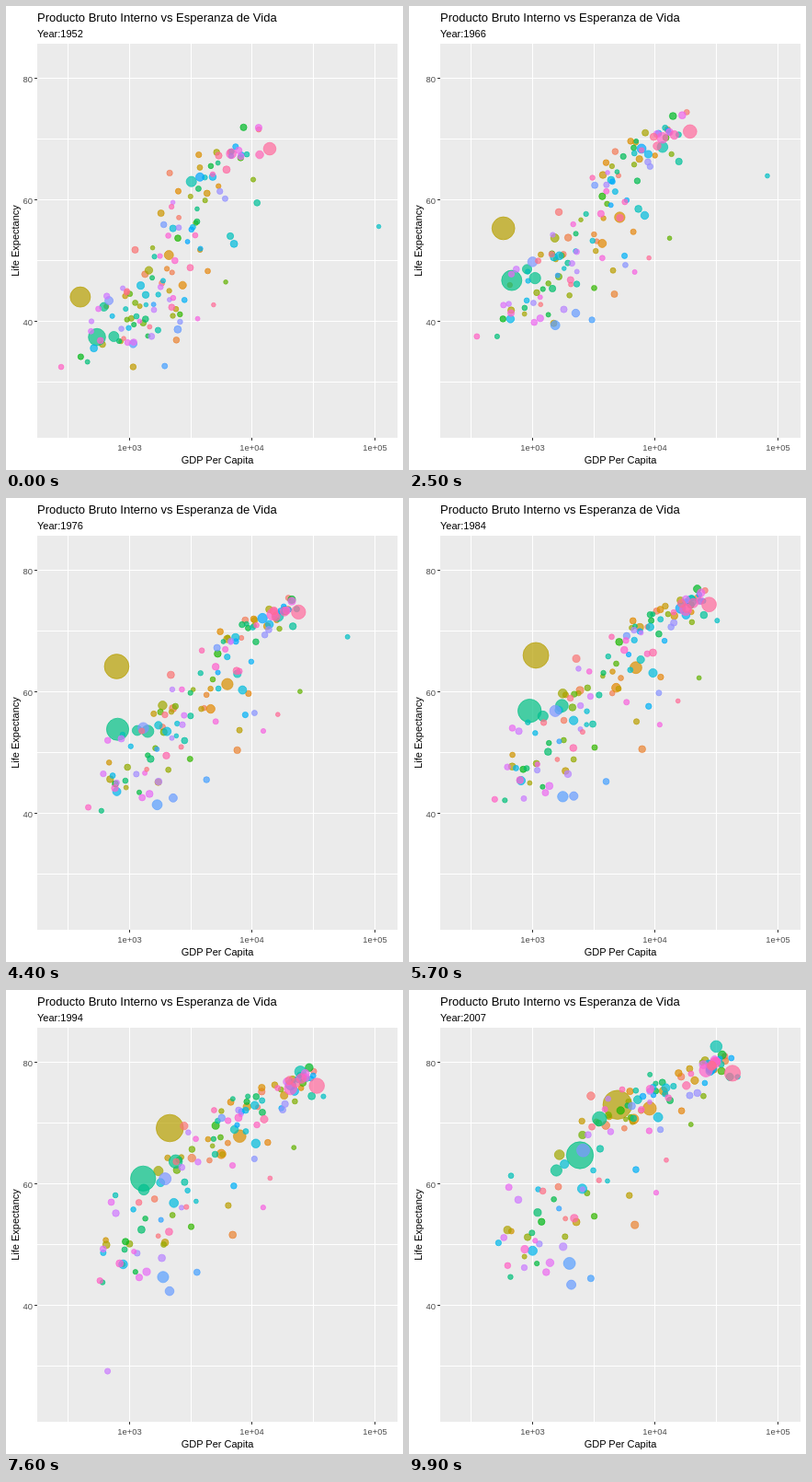
Animation, 432 px wide and 504 px high, one loop 10000 ms. Source, as an HTML page:

```html
<!DOCTYPE html>
<html lang="es">
<head>
<meta charset="utf-8">
<title>Producto Bruto Interno vs Esperanza de Vida</title>
<style>
  html, body { margin: 0; width: 100%; height: 100%; overflow: hidden; background: #fff; }
  svg { display: block; font-family: "Liberation Sans", Arial, sans-serif; font-size: 11px; }
  .tick { font-size: 9.4px; fill: #4d4d4d; }
  .grid { stroke: #fff; }
  .mark { stroke: #333; }
</style>
</head>
<body>
<svg width="432" height="504" viewBox="0 0 432 504">
  <rect width="432" height="504" fill="#fff"/>
  <rect x="34" y="41" width="392" height="428" fill="#ebebeb"/>
  <g id="axes"></g>
  <g id="dots" stroke-width="0.9" fill-opacity="0.7" stroke-opacity="0.7"></g>
  <text x="34" y="17" font-size="13">Producto Bruto Interno vs Esperanza de Vida</text>
  <text id="year" x="34" y="34">Year:1952</text>
  <text x="230" y="497" text-anchor="middle">GDP Per Capita</text>
  <text transform="translate(14 255) rotate(-90)" text-anchor="middle">Life Expectancy</text>
</svg>
<script>
const COUNT = 142, FRAMES = 100, STEP = 100;
const LAST = 11; // knots are five years apart, 1952 to 2007
const $ = id => document.getElementById(id);
const xOf = logGdp => 134 + 133.5 * (logGdp - 3);
const yOf = life => 342.5 - 6.6 * (life - 40);
const rOf = pop => 2.1 + 13.7 * Math.sqrt(pop / 1319);
const mix = (a, b, t) => a + (b - a) * t;
const knots = fn => Array.from({ length: LAST + 1 }, (_, k) => fn(k));

function add(parent, tag, attrs, text) {
  const el = document.createElementNS('http://www.w3.org/2000/svg', tag);
  for (const k in attrs) el.setAttribute(k, attrs[k]);
  if (text) el.textContent = text;
  parent.append(el);
  return el;
}

function drawAxes() {
  const g = $('axes');
  const line = (cls, x1, y1, x2, y2) => add(g, 'line', { class: cls, x1, y1, x2, y2 });
  for (const x of [67.5, 134.5, 201.5, 267.5, 334.5, 401.5]) line('grid', x, 41, x, 469);
  for (let y = 78.5; y < 469; y += 66) line('grid', 34, y, 426, y);
  [134.5, 267.5, 401.5].forEach((x, i) => {
    line('mark', x, 469, x, 472);
    add(g, 'text', { class: 'tick', x, y: 483, 'text-anchor': 'middle' }, '1e+0' + (i + 3));
  });
  for (const life of [80, 60, 40]) {
    const y = yOf(life);
    line('mark', 31, y, 34, y);
    add(g, 'text', { class: 'tick', x: 29, y: y + 4, 'text-anchor': 'end' }, String(life));
  }
}

// Evenly spaced hues in polar LUV, luminance 65, chroma 100
function hueColor(i) {
  const h = (15 + 360 * i / COUNT) * Math.PI / 180, L = 65, C = 100;
  const Y = ((L + 16) / 116) ** 3;
  const u = C * Math.cos(h) / (13 * L) + 0.19784;
  const v = C * Math.sin(h) / (13 * L) + 0.46834;
  const X = 9 * Y * u / (4 * v), Z = 3 * Y / v - X / 3 - 5 * Y;
  const rgb = [
    3.2405 * X - 1.5371 * Y - 0.4985 * Z,
    -0.9693 * X + 1.876 * Y + 0.0416 * Z,
    0.0556 * X - 0.204 * Y + 1.0572 * Z
  ].map(c => {
    const s = c <= 0.00304 ? 12.92 * c : 1.055 * c ** (1 / 2.4) - 0.055;
    return Math.round(255 * Math.min(1, Math.max(0, s)));
  });
  return `rgb(${rgb})`;
}

let seed = 1952;
function rand() {
  seed = (seed + 0x6D2B79F5) | 0;
  let t = Math.imul(seed ^ (seed >>> 15), 1 | seed);
  t = (t + Math.imul(t ^ (t >>> 7), 61 | t)) ^ t;
  return ((t ^ (t >>> 14)) >>> 0) / 4294967296;
}
// Bell-shaped, bounded to about three deviations
const bell = () => (rand() + rand() + rand() - 1.5) * 1.9;
const pair = () => {
  const a = bell();
  return [a, 0.6 * a + 0.8 * bell()];
};

// Value at knot k on a polyline of [knot, value] points
function along(points, k) {
  let j = 0;
  while (j < points.length - 2 && k > points[j + 1][0]) j++;
  const [[k0, a], [k1, b]] = points.slice(j, j + 2);
  return mix(a, b, (k - k0) / (k1 - k0));
}

const dots = [];
function addDot(i, logGdp, life, pop) {
  dots.push({
    i,
    x: knots(k => xOf(logGdp(k))),
    y: knots(k => yOf(life(k))),
    r: knots(k => rOf(pop(k)))
  });
}

// Path through key points [knot, gdp, life], population growing evenly
function addPath(i, pop0, pop1, points) {
  const gdp = points.map(([k, g]) => [k, Math.log10(g)]);
  const life = points.map(([k, , l]) => [k, l]);
  addDot(i, k => along(gdp, k), k => along(life, k), k => mix(pop0, pop1, k / LAST));
}

// Rise from start to end; bend below 1 grows early, above 1 late
function addRise(i, pop0, pop1, [g0, l0], [g1, l1], bend) {
  addDot(i,
    k => mix(Math.log10(g0), Math.log10(g1), (k / LAST) ** bend),
    k => mix(l0, l1, (k / LAST) ** 0.9),
    k => mix(pop0, pop1, k / LAST));
}

addPath(24, 556, 1319, [[0, 400, 44], [1, 576, 50.5], [2, 488, 44.5], [3, 613, 58.4],
  [4, 677, 63.1], [6, 962, 65.5], [11, 4959, 73]]);
addPath(58, 372, 1110, [[0, 547, 37.4], [5, 813, 54.2], [8, 1164, 60.2], [11, 2452, 64.7]]);
addPath(71, 0.2, 2.5, [[0, 108382, 55.6], [3, 80895, 64.6], [5, 59265, 69.3],
  [6, 31354, 71.3], [11, 47307, 77.6]]);
addPath(107, 2.5, 9, [[0, 493, 40], [6, 882, 46.2], [8, 737, 23.6], [9, 590, 36.1], [11, 863, 46.2]]);

addRise(134, 158, 301, [13990, 68.4], [42952, 78.2], 0.9);
addRise(59, 82, 224, [750, 37.5], [3541, 70.7], 1.1);
addRise(14, 57, 190, [2109, 50.9], [9066, 72.4], 0.35);
addRise(66, 86, 127, [3217, 63], [31656, 82.6], 0.42);
addRise(97, 41, 169, [685, 43.4], [2606, 65.5], 0.9);
addRise(94, 33, 135, [1077, 36.3], [2014, 46.9], 0.4);

// The rest: drifting clusters with mean and spread at 1952, 1977, 2007
const clusters = [
  { n: 22, pop: 9, gdp: [3.84, 4.24, 4.48], gdpSd: [0.17, 0.1, 0.09], life: [68, 73.5, 79.8], lifeSd: [2.6, 1.4, 1] },
  { n: 23, pop: 6, gdp: [3.52, 3.94, 4.08], gdpSd: [0.2, 0.15, 0.2], life: [61, 70, 75.3], lifeSd: [5, 1.8, 2] },
  { n: 37, pop: 6, gdp: [3.3, 3.6, 3.8], gdpSd: [0.24, 0.25, 0.3], life: [48.5, 60.5, 72.5], lifeSd: [6.5, 5, 3.5] },
  { n: 42, pop: 5, gdp: [2.96, 3.07, 3.1], gdpSd: [0.23, 0.23, 0.27], life: [39.5, 48.5, 54.5], lifeSd: [4.5, 5, 6.5] },
  { n: 8, pop: 4, gdp: [3.6, 4.15, 4.05], gdpSd: [0.2, 0.23, 0.25], life: [42, 56, 63], lifeSd: [5, 5, 9] }
];

function addMember(i, c) {
  const [a, b] = pair(), [da, db] = pair();
  const pop = c.pop * Math.exp(1.1 * bell());
  const path = (mean, sd, p, q, noise) => {
    const off = [p, 0.9 * p + 0.4 * q, 0.75 * p + 0.65 * q];
    const points = [0, 5, LAST].map((k, j) => [k, mean[j] + sd[j] * off[j]]);
    return k => along(points, k) + noise * bell();
  };
  addDot(i,
    path(c.gdp, c.gdpSd, a, da, 0.025),
    path(c.life, c.lifeSd, b, db, 0.3),
    k => pop * mix(0.7, 1.7, k / LAST));
}

const taken = new Set(dots.map(d => d.i));
const deck = clusters.flatMap(c => Array(c.n).fill(c));
for (let i = 0; i < COUNT; i++) {
  if (!taken.has(i)) addMember(i, deck.splice(Math.floor(rand() * deck.length), 1)[0]);
}

drawAxes();
dots.sort((p, q) => p.i - q.i);
for (const d of dots) {
  const color = hueColor(d.i);
  d.el = add($('dots'), 'circle', { fill: color, stroke: color });
}

let shown = -1;
function draw() {
  const frame = Math.floor(performance.now() / STEP) % FRAMES;
  if (frame !== shown) {
    shown = frame;
    const pos = frame / (FRAMES - 1) * LAST;
    const k = Math.min(LAST - 1, Math.floor(pos)), t = pos - k;
    const at = list => mix(list[k], list[k + 1], t).toFixed(2);
    for (const d of dots) {
      d.el.setAttribute('cx', at(d.x));
      d.el.setAttribute('cy', at(d.y));
      d.el.setAttribute('r', at(d.r));
    }
    $('year').textContent = 'Year:' + Math.round(1952 + pos * 5);
  }
  requestAnimationFrame(draw);
}
draw();
</script>
</body>
</html>
```
